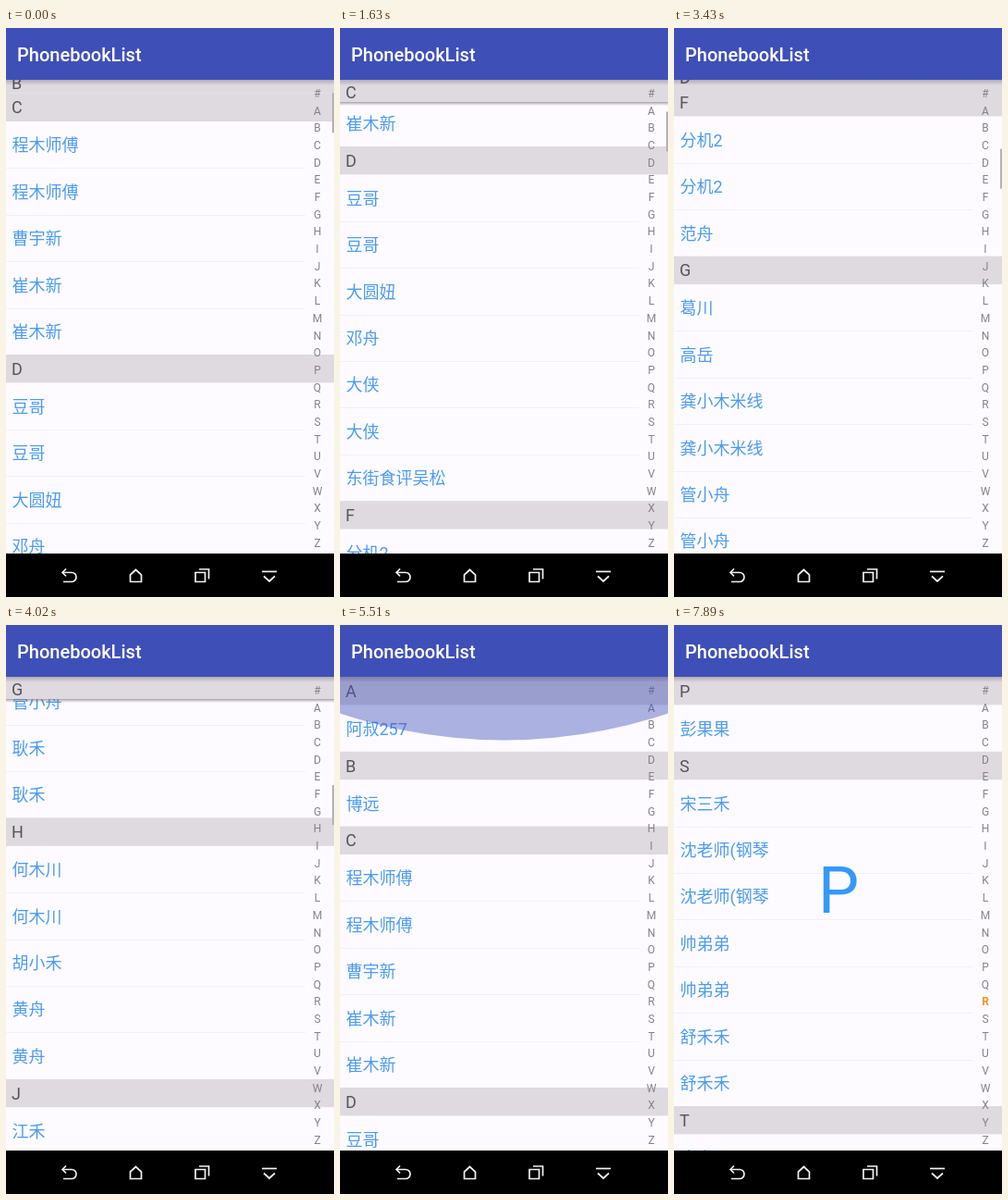
An HTML page with a canvas for the animation above (8000 ms loop, 355x615 px).

```html
<!DOCTYPE html>
<html lang="zh-CN">
<head>
<meta charset="utf-8">
<title>PhonebookList</title>
<style>
html, body { margin: 0; width: 100%; height: 100%; overflow: hidden; background: #fdfbff; }
canvas { display: block; }
</style>
</head>
<body>
<canvas id="stage" width="355" height="615"></canvas>
<script>
const ctx = document.getElementById('stage').getContext('2d');
const W = 355, TOP = 56, BOTTOM = 568;
const ROW = 50.4, HEAD = 30.4, PINNED = 24.4;
const LOOP = 8000, STEP = 149;
const FONT = "Roboto, 'Noto Sans CJK SC', 'Noto Sans CJK', sans-serif";
const LETTERS = '#ABCDEFGHIJKLMNOPQRSTUVWXYZ';

// A trailing * means the contact is listed twice.
const contacts = {
  A: '阿叔257',
  B: '博远',
  C: '程木师傅* 曹宇新 崔木新*',
  D: '豆哥* 大圆妞 邓舟 大侠* 东街食评吴松',
  F: '分机2* 范舟',
  G: '葛川 高岳 龚小木米线* 管小舟* 耿禾*',
  H: '何木川* 胡小禾 黄舟*',
  J: '江禾* 贾木云 金小舟*',
  L: '来电专线 卢舟* 林银叶新号 罗云川(同学* 梁木舟* 梁木舟湖州新 梁木舟新* 陆小禾* 黎川*',
  M: '马小舟* 孟禾*',
  P: '彭果果',
  S: '宋三禾 沈老师(钢琴* 帅弟弟* 舒禾禾*',
  T: '唐木禾*'
};

let end = 0;
const sections = Object.entries(contacts).map(([letter, text]) => {
  const names = text.split(' ').flatMap(s => s.endsWith('*') ? Array(2).fill(s.slice(0, -1)) : [s]);
  const top = end;
  end += HEAD + names.length * ROW;
  return { letter, names, top, bottom: end };
});

// [step, scroll offset]
const scrollPath = [
  [0, 147], [2, 236], [4, 282], [6, 298], [7, 298], [11, 372], [14, 500],
  [17, 548], [18, 548], [19, 572.2], [23, 818.2], [27, 1290], [30, 1830],
  [32, 2013.5], [33, 2040], [34, 1780], [36, 320], [37, 0]
];

function scrollAt(step) {
  const i = scrollPath.findIndex(p => p[0] >= step);
  if (i < 0) return 0;
  if (i === 0) return scrollPath[0][1];
  const [s0, y0] = scrollPath[i - 1], [s1, y1] = scrollPath[i];
  return y0 + (y1 - y0) * (step - s0) / (s1 - s0);
}

function text(str, x, y, size, color, weight = 400, align = 'left') {
  ctx.font = `${weight} ${size}px ${FONT}`;
  ctx.fillStyle = color;
  ctx.textAlign = align;
  ctx.fillText(str, x, y);
}

function rect(x, y, w, h, color) {
  ctx.fillStyle = color;
  ctx.fillRect(x, y, w, h);
}

function shadow(y, height, alpha) {
  const g = ctx.createLinearGradient(0, y, 0, y + height);
  g.addColorStop(0, `rgba(40,36,50,${alpha})`);
  g.addColorStop(1, 'rgba(40,36,50,0)');
  rect(0, y, W, height, g);
}

function drawList(scroll) {
  for (const { letter, names, top, bottom } of sections) {
    const y = TOP + top - scroll;
    if (y > BOTTOM || TOP + bottom - scroll < TOP) continue;
    rect(0, y, W, HEAD, '#dedae0');
    text(letter, 6, y + 21.8, 18, '#58555a');
    names.forEach((name, i) => {
      const rowY = y + HEAD + i * ROW;
      if (i) rect(0, Math.round(rowY), 324, 1, '#f2f0f4');
      text(name, 6.5, rowY + 32.4, 18, '#4c9bee');
    });
  }
}

function drawPinned(scroll) {
  const i = sections.findIndex(s => s.bottom > scroll);
  if (scroll - sections[i].top < 0.5) return;
  const next = TOP + sections[i].bottom - scroll;
  const y = Math.min(TOP, next - PINNED);
  rect(0, y, W, PINNED, '#dedae0');
  text(sections[i].letter, 6, y + 19.6, 18, '#58555a');
  if (y === TOP) shadow(y + PINNED - 0.4, 4, 0.38);
}

function drawGlow(strength) {
  const sag = 29 * strength, half = W / 2;
  const radius = (half * half + sag * sag) / (2 * sag);
  const low = TOP + 68.5 * strength;
  ctx.fillStyle = `rgba(63,79,184,${0.43 * strength})`;
  ctx.beginPath();
  ctx.arc(half, low - radius, radius, 0, Math.PI * 2);
  ctx.fill();
}

function drawIndex(active) {
  [...LETTERS].forEach((letter, i) => {
    const on = i === active;
    text(letter, 337, 75 + i * 18.68, 12, on ? '#f5952d' : '#858287', on ? 700 : 400, 'center');
  });
}

function line(points, closed) {
  ctx.beginPath();
  points.forEach(([x, y]) => ctx.lineTo(x, y));
  if (closed) ctx.closePath();
  ctx.stroke();
}

function drawBars() {
  rect(0, 0, W, TOP, '#3f4fb8');
  text('PhonebookList', 12, 36, 20, '#fff', 500);

  rect(0, BOTTOM, W, 615 - BOTTOM, '#000');
  ctx.strokeStyle = '#f2f2f2';
  ctx.lineWidth = 1.7;
  ctx.beginPath();
  ctx.moveTo(62, 588.5);
  ctx.lineTo(71, 588.5);
  ctx.arc(71, 593.5, 5, -Math.PI / 2, Math.PI / 2);
  ctx.lineTo(62, 598.5);
  ctx.stroke();
  line([[65, 584.5], [61, 588.5], [65, 592.5]]);
  line([[134.5, 591], [140.5, 585.5], [146.5, 591], [146.5, 598.5], [134.5, 598.5]], true);
  line([[205, 588.5], [215.5, 588.5], [215.5, 598.5], [205, 598.5]], true);
  line([[209, 585], [219.5, 585], [219.5, 595.5]]);
  line([[277, 587.5], [293, 587.5]]);
  line([[279, 592.5], [285, 598], [291, 592.5]]);
}

function draw(time) {
  const step = Math.floor((time % LOOP + 16) / STEP);
  const touching = step >= 42;
  const active = touching ? Math.round(1 + (step - 42) * 17 / 11) : -1;
  const section = touching && sections.filter(s => s.letter <= LETTERS[active]).pop();
  const scroll = touching ? section.top : scrollAt(step);
  const glow = step >= 37 ? Math.max(0, 1 - (step - 37) * 0.27) : 0;

  rect(0, 0, W, 615, '#fdfbff');
  ctx.save();
  ctx.beginPath();
  ctx.rect(0, TOP, W, BOTTOM - TOP);
  ctx.clip();
  drawList(scroll);
  drawPinned(scroll);
  if (step < 37) rect(353, 57 + scroll * 0.09, 2, 43, '#b4b1b6');
  drawIndex(active);
  if (glow > 0) drawGlow(glow);
  shadow(TOP, 6, 0.25);
  if (touching) text(section.letter, 178, 311, 70, '#3598fa', 400, 'center');
  ctx.restore();
  drawBars();
}

const start = performance.now();
function tick() {
  draw(performance.now() - start);
  requestAnimationFrame(tick);
}
tick();
</script>
</body>
</html>
```
